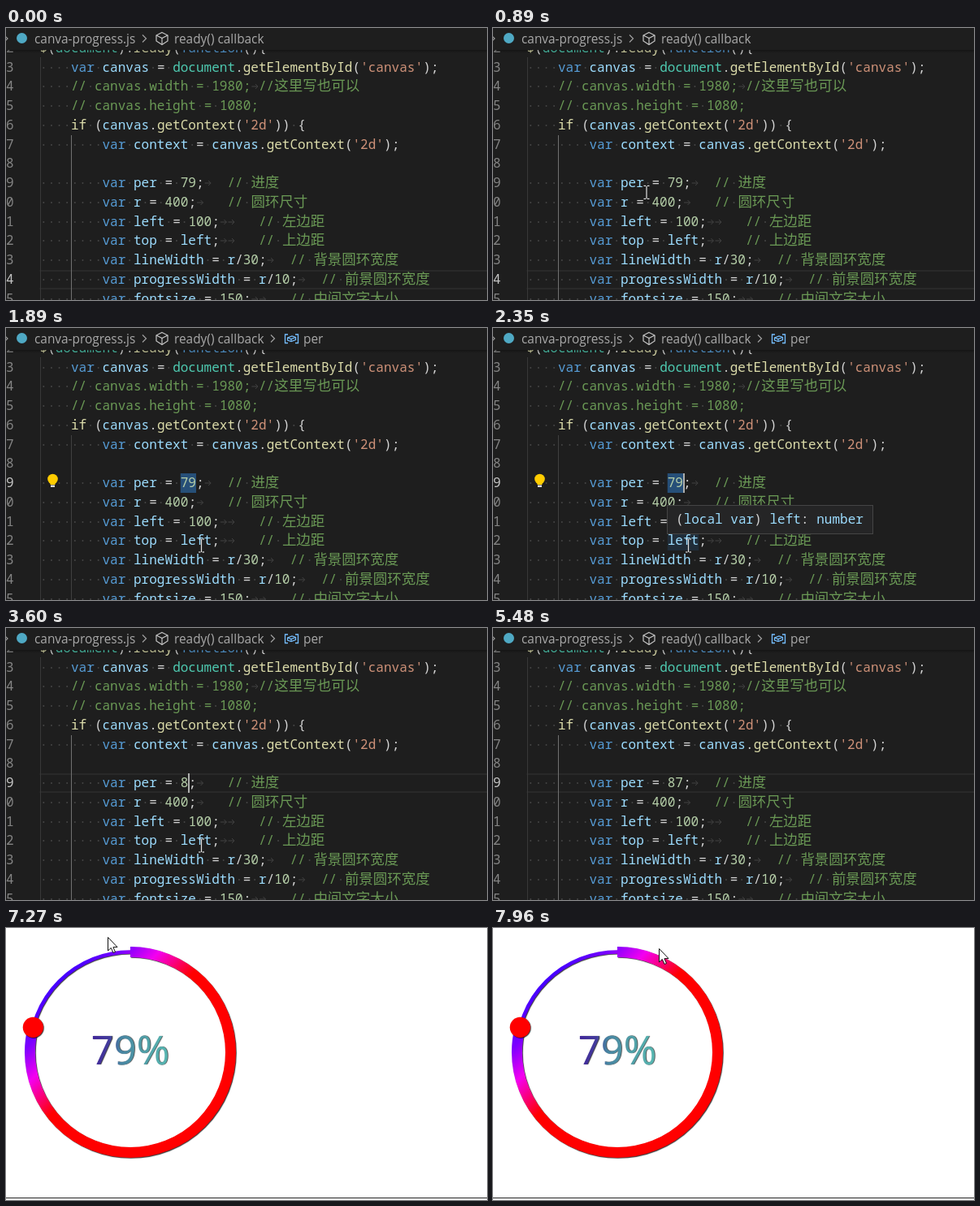
An HTML page with a canvas for the animation above (8 s loop, 592 px wide and 335 px high).

```html
<!DOCTYPE html>
<html lang="zh">
<head>
<meta charset="utf-8">
<title>Canvas progress ring</title>
<style>
html, body { margin: 0; width: 100%; height: 100%; overflow: hidden; background: #1e1e1e; }
canvas { display: block; }
</style>
</head>
<body>
<canvas id="stage" width="592" height="335"></canvas>
<script>
const ctx = document.getElementById('stage').getContext('2d');
const W = 592, H = 335, LOOP = 8000;
const CHAR = 9.625, LEFT = 41.5, ROW = 23.75;
const MONO = '500 16.04px "Noto Sans Mono", "DejaVu Sans Mono", monospace';
const CJK = '17.5px "Noto Sans CJK SC", "Noto Sans CJK", sans-serif';
const UI = '15.4px "Open Sans", "Noto Sans", sans-serif';

const INK = {
  comment: '#6a9955', string: '#ce9178', keyword: '#569cd6', control: '#dcdcaa',
  global: '#4ec9b0', number: '#b5cea8', call: '#dcdcaa', name: '#9cdcfe', plain: '#d4d4d4'
};
const KINDS = ['comment', 'string', 'keyword', 'control', 'global', 'number', 'call', 'name', 'plain'];
const TOKEN = /(\/\/.*)|('[^']*')|\b(var|function)\b|\b(if)\b|\b(document)\b|\b(\d+)\b|([$\w]+(?=\())|([A-Za-z_]\w*)|(\s|.)/g;

const FIRST = 2;
const LINES = [
  '$(document).ready(function(){',
  "    var canvas = document.getElementById('canvas');",
  '    // canvas.width = 1980;\t//这里写也可以',
  '    // canvas.height = 1080;',
  "    if (canvas.getContext('2d')) {",
  "        var context = canvas.getContext('2d');",
  '',
  '        var per = @;\t// 进度',
  '        var r = 400;\t// 圆环尺寸',
  '        var left = 100;\t\t// 左边距',
  '        var top = left;\t\t// 上边距',
  '        var lineWidth = r/30;\t// 背景圆环宽度',
  '        var progressWidth = r/10;\t// 前景圆环宽度',
  '        var fontsize = 150;\t\t// 中间文字大小'
];

const rowTop = n => 36.5 + ROW * (n - 3);
const colX = c => LEFT + c * CHAR;
const within = (t, a, b) => t >= a && t < b;

function rect(x, y, w, h, color) {
  ctx.fillStyle = color;
  ctx.fillRect(x, y, w, h);
}

function label(text, x, y, font, color) {
  ctx.font = font;
  ctx.fillStyle = color;
  ctx.fillText(text, x, y);
}

function disc(x, y, r, color) {
  ctx.fillStyle = color;
  ctx.beginPath();
  ctx.arc(x, y, r, 0, Math.PI * 2);
  ctx.fill();
}

function stroke(points, color, width, close) {
  ctx.strokeStyle = color;
  ctx.lineWidth = width;
  ctx.beginPath();
  points.forEach(([x, y]) => ctx.lineTo(x, y));
  if (close) ctx.closePath();
  ctx.stroke();
}

function tabMark(x, y) {
  stroke([[x + 1, y], [x + 8.5, y]], '#424242', 1);
  stroke([[x + 5.5, y - 3], [x + 8.5, y], [x + 5.5, y + 3]], '#424242', 1);
}

// Draws one code line on the character grid, with marks for blanks.
function codeLine(text, n) {
  const base = Math.round(rowTop(n) + 17);
  let x = LEFT;
  for (const m of text.matchAll(TOKEN)) {
    const color = INK[KINDS[m.slice(1).findIndex(g => g !== undefined)]];
    for (const part of m[0].split(/([ \t]|[\u3000-\u9fff]+)/)) {
      if (!part) continue;
      if (part === ' ') {
        disc(x + CHAR / 2, base - 5, 1, '#464646');
        x += CHAR;
      } else if (part === '\t') {
        tabMark(x, base - 5);
        const col = Math.round((x - LEFT) / CHAR);
        x = colX((Math.floor(col / 4) + 1) * 4);
      } else if (part > '\u3000') {
        label(part, x, base, CJK, color);
        x += part.length * 17.5;
      } else {
        label(part, x, base, MONO, color);
        x += part.length * CHAR;
      }
    }
  }
}

function chevron(x) {
  stroke([[x - 2, 8.5], [x + 2.5, 13], [x - 2, 17.5]], '#a0a0a0', 1.2);
}

function breadcrumbs(showVar) {
  rect(0, 0, W, 27, '#1e1e1e');
  const shade = ctx.createLinearGradient(0, 27, 0, 31);
  shade.addColorStop(0, 'rgba(0,0,0,.3)');
  shade.addColorStop(1, 'rgba(0,0,0,0)');
  rect(0, 27, W, 4, shade);

  const y = 18.5, grey = '#a9a9a9';
  chevron(-.5);
  disc(19.5, 12.5, 6.5, '#4fa9c4');
  label('canva-progress.js', 35, y, UI, grey);
  chevron(170);
  const cube = '#c5c5c5';
  stroke([[192, 5.5], [199, 9], [199, 16], [192, 20.5], [185, 16], [185, 9]], cube, 1.2, true);
  stroke([[185, 9], [192, 12.5], [199, 9]], cube, 1.2);
  stroke([[192, 12.5], [192, 20.5]], cube, 1.2);
  label('ready() callback', 207, y, UI, grey);
  if (!showVar) return;
  chevron(328);
  const blue = '#75beff';
  stroke([[347, 8], [343.5, 8], [343.5, 18.5], [347, 18.5]], blue, 1.3);
  stroke([[356, 8], [359.5, 8], [359.5, 18.5], [356, 18.5]], blue, 1.3);
  stroke([[346.5, 12], [352, 10], [356.5, 11.5], [356.5, 14.5], [351, 16.5], [346.5, 15]], blue, 1.2, true);
  stroke([[346.5, 12], [351, 13.5], [356.5, 11.5]], blue, 1.2);
  stroke([[351, 13.5], [351, 16.5]], blue, 1.2);
  label('per', 366, y, UI, grey);
}

function bulb() {
  disc(57.5, 186, 6.3, '#ffcc00');
  rect(54.5, 189, 6, 4, '#ffcc00');
  rect(55, 193.5, 5, 2.5, '#d8d8d8');
}

function tooltip(alpha) {
  ctx.globalAlpha = alpha;
  rect(214, 218, 254, 36, '#454545');
  rect(215, 219, 252, 34, '#252526');
  const parts = [['(', 'plain'], ['local var', 'name'], [')', 'plain'], [' left', 'name'], [':', 'plain'], [' number', 'name']];
  let x = 225;
  for (const [text, kind] of parts) {
    label(text, x, 241, MONO, INK[kind]);
    x += text.length * CHAR;
  }
  ctx.globalAlpha = 1;
}

function textPointer([x, y]) {
  const c = '#e2e2e2';
  stroke([[x + .5, y - 8], [x + .5, y + 8]], c, 1.2);
  for (const d of [-8, 8]) {
    stroke([[x - 3, y + d], [x - .5, y + d]], c, 1.2);
    stroke([[x + 1.5, y + d], [x + 4, y + d]], c, 1.2);
  }
}

function arrowPointer([x, y]) {
  const shape = [[0, 0], [0, 16.5], [3.8, 13], [6.5, 19], [9, 18], [6.4, 12.2], [11.5, 12]];
  ctx.beginPath();
  shape.forEach(([a, b]) => ctx.lineTo(x + a + .5, y + b + .5));
  ctx.closePath();
  ctx.fillStyle = '#fff';
  ctx.fill();
  ctx.strokeStyle = '#111';
  ctx.lineWidth = 1;
  ctx.stroke();
}

function glide(t, start, end, steps, points) {
  const raw = Math.min(1, Math.max(0, (t - start) / (end - start)));
  const step = Math.min(steps - 1, Math.floor(raw * (steps - 1) + .1));
  const p = step / (steps - 1) * (points.length - 1);
  const i = Math.min(points.length - 2, Math.floor(p));
  const f = p - i, [a, b] = [points[i], points[i + 1]];
  return [a[0] + (b[0] - a[0]) * f, a[1] + (b[1] - a[1]) * f];
}

function editorPointer(t) {
  if (t < 200 || t >= 5250) return null;
  if (t < 1040) return glide(t, 200, 970, 11, [[357, 310], [235, 262], [129, 215], [214, 197]]);
  if (t < 1580) return glide(t, 1040, 1430, 6, [[219, 192], [234.5, 191]]);
  if (t < 4930) return glide(t, 1580, 1890, 5, [[236, 200], [240, 268]]);
  return glide(t, 4930, 5170, 4, [[270, 292], [350, 265], [420, 205], [483, 146]]);
}

function pagePointer(t) {
  if (within(t, 6340, 6570)) return glide(t, 6340, 6500, 3, [[205, 7], [97, 1]]);
  if (within(t, 7270, 7810)) return glide(t, 7270, 7580, 5, [[125, 11], [230, 115], [328, 215]]);
  if (t >= 7810) return glide(t, 7810, 7960, 3, [[300, 165], [245, 80], [204, 25]]);
  return null;
}

function typedValue(t) {
  if (t < 2660) return '79';
  if (t < 2810) return '8';
  if (t < 3600) return '88';
  return t < 3920 ? '8' : '87';
}

function caretColumn(t) {
  if (t < 1270) return 18;
  if (t < 1430) return 19;
  return 18 + typedValue(t).length;
}

const caretOn = t => within(t, 1040, 1890) || within(t, 2270, 3280) ||
  within(t, 3600, 4460) || within(t, 4930, 5480);

function editor(t) {
  rect(0, 0, W, H, '#1e1e1e');
  const active = t < 1040 ? 14 : 9;
  const selected = within(t, 1270, 2660);

  if (selected) {
    rect(colX(18), 179, (caretColumn(t) - 18) * CHAR, 24, '#264f78');
  } else {
    const y = Math.round(rowTop(active));
    rect(LEFT, y, W, 2, '#292929');
    rect(LEFT, y + 22, W, 2, '#292929');
  }
  if (within(t, 2200, 2660)) rect(colX(18), 251, 4 * CHAR, 23, 'rgba(38,79,120,.3)');

  rect(42, 36, 1, H, '#383838');
  rect(80, 132, 1, H, selected ? '#404040' : '#707070');

  LINES.forEach((line, i) => {
    const n = FIRST + i;
    codeLine(line.replace('@', typedValue(t)), n);
    label(String(n % 10), 0, Math.round(rowTop(n) + 17), MONO, n === active ? '#c6c6c6' : '#858585');
  });
  breadcrumbs(t >= 1200);

  if (within(t, 1740, 3040)) bulb();
  if (caretOn(t)) rect(Math.round(colX(caretColumn(t)) - .5), 179, 2, 24, '#aeafad');
  if (within(t, 2200, 2660)) tooltip(t < 2270 ? .4 : t < 2350 ? .8 : 1);

  const at = editorPointer(t);
  if (!at) return;
  if (within(t, 1040, 1580)) disc(at[0], at[1], 14.5, 'rgba(218,206,12,.75)');
  textPointer(at);
}

function ringInk() {
  // Diagonal gradient, placed by the sum x + y.
  const g = ctx.createLinearGradient(65, 65, 145, 145);
  const stop = (sum, color) => g.addColorStop((sum - 130) / 160, color);
  stop(130, '#4600ff');
  stop(172, '#7a00ff');
  stop(218, '#f400f0');
  stop(285, '#ff0000');
  return g;
}

function page(t) {
  rect(0, 0, W, H, '#fff');
  rect(0, 332, W, 1, '#222');
  const cx = 153, cy = 153, r = 123.5, top = -Math.PI / 2;
  const end = top + Math.PI * 2 * .79;

  ctx.save();
  ctx.shadowColor = 'rgba(0,0,0,.8)';
  ctx.shadowOffsetX = ctx.shadowOffsetY = .8;
  ctx.shadowBlur = 1;
  ctx.strokeStyle = ringInk();
  for (const [width, stop] of [[4.5, top + Math.PI * 2], [13, end]]) {
    ctx.lineWidth = width;
    ctx.beginPath();
    ctx.arc(cx, cy, r, top, stop);
    ctx.stroke();
  }
  disc(cx + r * Math.cos(end), cy + r * Math.sin(end), 12.6, '#ff0000');

  const g = ctx.createLinearGradient(107, 0, 200, 0);
  g.addColorStop(0, '#42289a');
  g.addColorStop(.22, '#433c9c');
  g.addColorStop(.36, '#4784a2');
  g.addColorStop(.65, '#509ca6');
  g.addColorStop(1, '#58b8b2');
  ctx.textAlign = 'center';
  label('79%', cx, 167.5, '48.75px "Noto Sans", "Open Sans", sans-serif', g);
  ctx.restore();

  const at = pagePointer(t);
  if (at) arrowPointer(at);
}

const begin = performance.now();

function run() {
  const t = (performance.now() - begin) % LOOP;
  if (t < 5950) editor(t);
  else page(t);
  requestAnimationFrame(run);
}
run();
</script>
</body>
</html>
```
